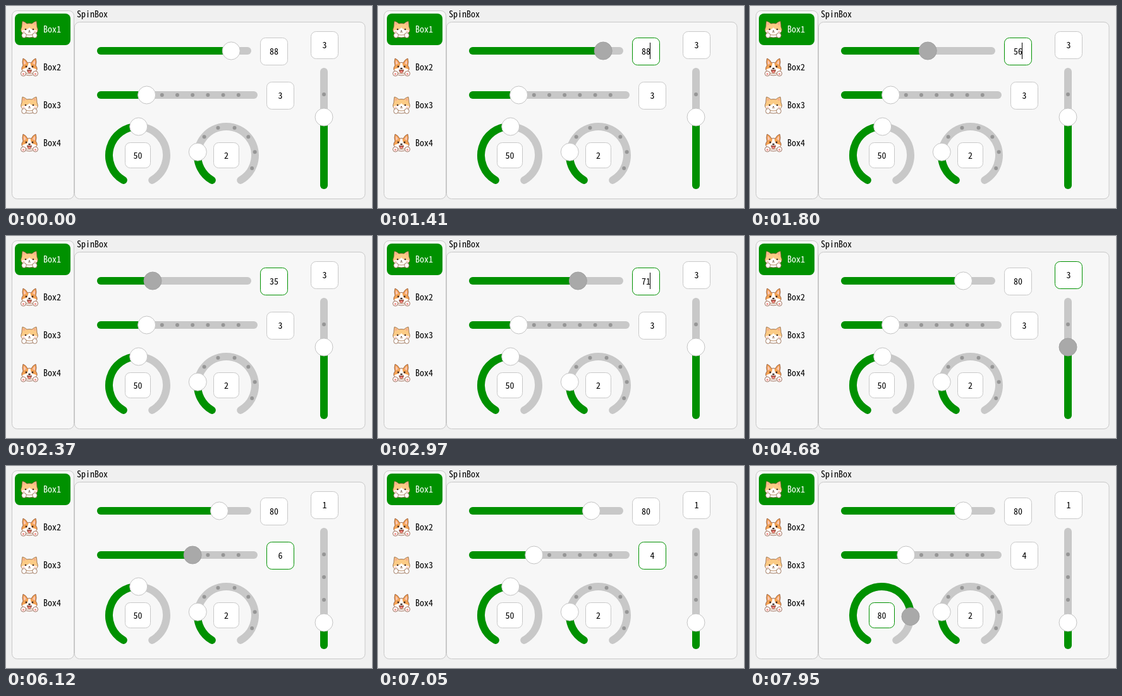
An HTML page for the animation above (8000 ms loop, 579 by 320 pixels).

```html
<!DOCTYPE html>
<html lang="en">
<head>
<meta charset="utf-8">
<title>SpinBox</title>
<style>
  html, body { margin: 0; width: 100%; height: 100%; overflow: hidden; background: #f0f0f0; }
  svg { display: block; width: 579px; height: 320px; }
  text { font: 14px "Noto Sans Mono CJK SC", "Noto Sans Mono CJK JP", "Noto Sans CJK SC", "Noto Sans Mono", monospace; }
  .panel { fill: #f7f7f7; stroke: #c8c8c8; }
  .rail, .fill { fill: none; stroke-width: 12; stroke-linecap: round; }
  .rail { stroke: #c8c8c8; }
  .fill { stroke: #009100; }
  .dot { fill: #969696; }
  .knob { fill: #fff; stroke: #c4c4c4; }
  .box { fill: #fff; stroke: #c8c8c8; }
  .focus .box { stroke: #009100; }
  .pressed .knob { fill: #a9a9a9; stroke: #a0a0a0; }
  .value { text-anchor: middle; }
  .caret { stroke: #000; }
</style>
</head>
<body>
<svg id="stage" viewBox="0 0 579 320">
  <defs>
    <g id="cat" stroke="#8a5a3a" stroke-width=".8" stroke-linejoin="round">
      <path d="M-10 4Q-11 13 0 13Q11 13 10 4Z" fill="#fff"/>
      <path d="M-11-13Q-7-12-4-9Q0-10 4-9Q7-12 11-13Q12-8 12-4Q14 0 13 3Q10 9 0 9Q-10 9-13 3Q-14 0-12-4Q-12-8-11-13Z" fill="#fbcb86"/>
      <path d="M0-3Q3 1 9 1Q12 1 12.500 3Q9 8.500 0 8.500Q-9 8.500-12.500 3Q-12 1-9 1Q-3 1 0-3Z" fill="#fff" stroke="none"/>
      <path d="M-10-11L-9.500-6L-6-9ZM10-11L9.500-6L6-9Z" fill="#f6a990" stroke="none"/>
      <path d="M-2 4Q-1 5.500 0 4Q1 5.500 2 4" fill="none"/>
      <g fill="#49302a" stroke="none"><circle cx="-6" cy="0" r="1.300"/><circle cx="6" cy="0" r="1.300"/><ellipse cy="2.500" rx="1.200" ry=".8"/></g>
      <g fill="#ffb9aa" stroke="none"><ellipse cx="-9" cy="3.500" rx="1.800" ry="1.100"/><ellipse cx="9" cy="3.500" rx="1.800" ry="1.100"/></g>
      <g fill="#fff"><ellipse cx="-8.500" cy="9.500" rx="3.700" ry="4"/><ellipse cx="8.500" cy="9.500" rx="3.700" ry="4"/></g>
    </g>
    <g id="dog" stroke="#8a5036" stroke-width=".8" stroke-linejoin="round">
      <path d="M-9 3Q-10 13 0 13Q10 13 9 3Z" fill="#fff"/>
      <path d="M-10-14Q-5-12-3-7Q0-8 3-7Q5-12 10-14Q12-8 10-3Q13 1 12 4Q8 10 0 10Q-8 10-12 4Q-13 1-10-3Q-12-8-10-14Z" fill="#f3a355"/>
      <path d="M-9-11Q-6-9-5-6L-9-4ZM9-11Q6-9 5-6L9-4Z" fill="#fbc6b2" stroke="none"/>
      <path d="M-1.500-7H1.500Q2 0 6 1.500Q10 2 11.500 4Q8 9.500 0 9.500Q-8 9.500-11.500 4Q-10 2-6 1.500Q-2 0-1.500-7Z" fill="#fff" stroke="none"/>
      <path d="M-3.500 4Q0 5 3.500 4Q3 9 0 9Q-3 9-3.500 4Z" fill="#b84b42"/>
      <ellipse cy="7.300" rx="1.800" ry="1.400" fill="#ff8f8a" stroke="none"/>
      <g fill="#3d2924" stroke="none"><circle cx="-5" cy="-1" r="1.400"/><circle cx="5" cy="-1" r="1.400"/><ellipse cy="2" rx="1.800" ry="1.200"/></g>
      <g fill="#fff"><circle cx="-9.500" cy="10" r="4"/><circle cx="9.500" cy="10" r="4"/></g>
      <g fill="#f59a94" stroke="none"><circle cx="-9.500" cy="10.800" r="1.700"/><circle cx="9.500" cy="10.800" r="1.700"/></g>
    </g>
  </defs>
  <rect class="panel" x="9.500" y="7.500" width="98" height="298" rx="8"/>
  <rect class="panel" x="108.500" y="25.500" width="459.500" height="280" rx="8"/>
  <rect x="14" y="12" width="88" height="50" rx="8" fill="#009100"/>
  <text x="112" y="18">SpinBox</text>
</svg>
<script>
const LOOP = 8000, TICK = 30;
const stage = document.getElementById('stage');

function add(parent, tag, attrs = {}, text = '') {
  const el = document.createElementNS('http://www.w3.org/2000/svg', tag);
  for (const [key, val] of Object.entries(attrs)) el.setAttribute(key, val);
  el.textContent = text;
  return parent.appendChild(el);
}

for (let i = 0; i < 4; i++) {
  const y = 37 + 60 * i;
  add(stage, 'use', { href: i % 2 ? '#dog' : '#cat', transform: `translate(37 ${y})` });
  add(stage, 'text', { x: 59, y: y + 5, fill: i ? '#000' : '#fff' }, `Box${i + 1}`);
}

// Each shape maps a fraction of the range to a point and to a path from the start.
const line = (x1, y1, x2, y2) => {
  const at = f => [x1 + (x2 - x1) * f, y1 + (y2 - y1) * f];
  return { at, path: f => `M${x1} ${y1}L${at(f)}` };
};
const dial = (cx, cy, r) => {
  const at = f => {
    const a = (f * 300 - 150) * Math.PI / 180;
    return [cx + r * Math.sin(a), cy - r * Math.cos(a)];
  };
  return { at, path: f => `M${at(0)}A${r} ${r} 0 ${f > .6 ? 1 : 0} 1 ${at(f)}` };
};

const within = (spans, t) => spans.some(([from, to]) => t >= from && t < to);

// Keys are [time, value]; a third entry means gliding to the next key.
function valueAt(keys, t) {
  let i = keys.length - 1;
  while (i && keys[i][0] > t) i--;
  const [t0, v0, glide] = keys[i];
  if (!glide) return v0;
  const [t1, v1] = keys[i + 1];
  return Math.round(v0 + (v1 - v0) * (t - t0) / (t1 - t0));
}

function spinner({ shape, max, dots, box: [x, y, size], keys, focus = [], press = [], caret = [] }) {
  const g = add(stage, 'g');
  add(g, 'path', { class: 'rail', d: shape.path(1) });
  const marks = [];
  for (let v = 1; dots && v < max; v++) {
    const [cx, cy] = shape.at(v / max);
    marks[v] = add(g, 'circle', { class: 'dot', cx, cy, r: 3 });
  }
  const fill = add(g, 'path', { class: 'fill' });
  const knob = add(g, 'circle', { class: 'knob', r: 14 });
  add(g, 'rect', { class: 'box', x: x + .5, y: y + .5, width: size, height: size, rx: 8 });
  const midX = x + size / 2 + .5, midY = y + size / 2 + .5;
  const label = add(g, 'text', { class: 'value', x: midX, y: midY + 5 });
  const bar = add(g, 'path', { class: 'caret' });

  return t => {
    const v = valueAt(keys, t), [cx, cy] = shape.at(v / max);
    fill.setAttribute('d', shape.path(v / max));
    knob.setAttribute('cx', cx);
    knob.setAttribute('cy', cy);
    marks.forEach((mark, i) => mark.setAttribute('visibility', i > v ? 'visible' : 'hidden'));
    label.textContent = v;
    const barX = Math.floor(midX + String(v).length * 3.5) - .5;
    bar.setAttribute('d', `M${barX} ${midY - 14}v26`);
    bar.setAttribute('visibility', within(caret, t) ? 'visible' : 'hidden');
    g.classList.toggle('focus', within(focus, t));
    g.classList.toggle('pressed', within(press, t));
  };
}

const spinners = [
  {
    shape: line(150, 71, 382, 71), max: 99, box: [402, 50, 43],
    keys: [[0, 88], [1440, 88, 1], [2130, 27], [2250, 27, 1], [2370, 35, 1], [2970, 71, 1], [3060, 74],
      [3120, 75], [3180, 76], [3240, 77], [3300, 78], [3390, 79], [3480, 80]],
    focus: [[1410, 4260]], press: [[1410, 3630]], caret: [[1410, 1940], [2470, 3000]]
  },
  {
    shape: line(150, 141, 392, 141), max: 10, dots: true, box: [412, 120, 43],
    keys: [[0, 3], [5970, 4], [6060, 5], [6120, 6], [6150, 7], [6210, 8], [6330, 9],
      [6570, 8], [6630, 7], [6720, 6], [6840, 5], [6990, 4]],
    focus: [[5850, 7470]], press: [[5850, 7050]], caret: [[5850, 6120], [6630, 6990]]
  },
  {
    shape: line(503, 284, 503, 104), max: 5, dots: true, box: [482, 40, 43],
    keys: [[0, 3], [4800, 2], [4920, 1]],
    focus: [[4260, 5850]], press: [[4260, 4350], [4680, 5160]], caret: [[4260, 4410], [5190, 5850]]
  },
  {
    shape: dial(208.5, 236.5, 45.5), max: 99, box: [188, 216, 40],
    keys: [[0, 50], [7470, 50, 1], [7950, 80]],
    focus: [[7470, LOOP]], press: [[7470, LOOP]], caret: [[7470, 7800]]
  },
  { shape: dial(348.5, 236.5, 45.5), max: 9, dots: true, box: [328, 216, 40], keys: [[0, 2]] }
].map(spinner);

function draw(now) {
  const t = Math.floor((now % LOOP) / TICK) * TICK;
  spinners.forEach(update => update(t));
  requestAnimationFrame(draw);
}
draw(0);
</script>
</body>
</html>
```
